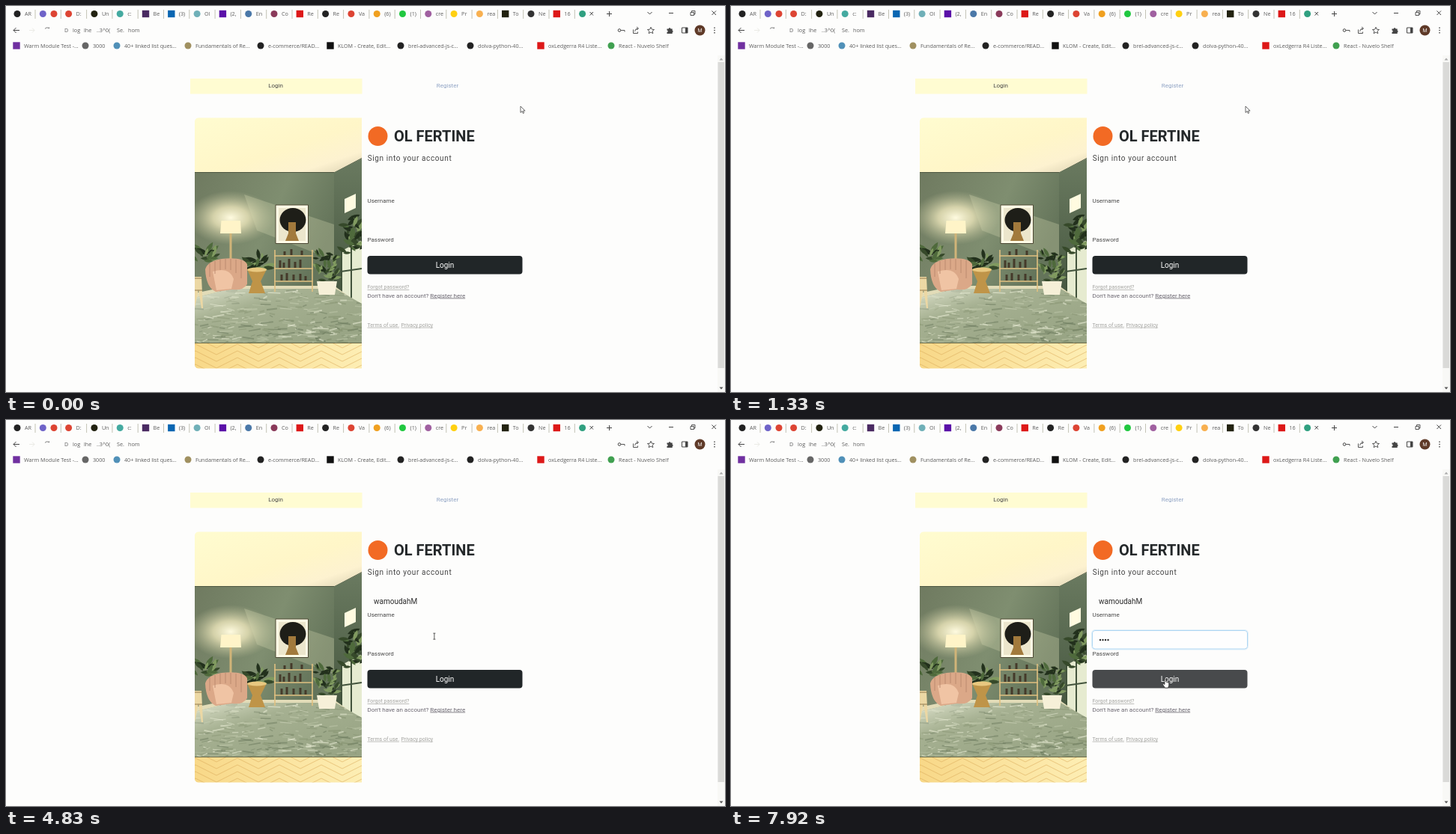
Animation of 960 by 516 pixels, one loop 8 s. Source, as an HTML page:

```html
<!DOCTYPE html>
<html lang="en">
<head>
<meta charset="utf-8">
<title>Sign in</title>
<style>
  html, body { margin: 0; width: 100%; height: 100%; overflow: hidden; background: #fdfdfc; }
  svg { display: block; width: 100vw; height: 100vh; }
  text { font-family: Roboto, sans-serif; white-space: pre; }
  .ui text { font-family: "Open Sans", "Noto Sans", sans-serif; font-size: 7.2px; fill: #5c5c5c; }
  .line { fill: none; stroke: #444; }
  .s7 { font-size: 7px; fill: #a4a4a0; }
  .s8 { font-size: 8px; fill: #484848; }
  .s10 { font-size: 10px; fill: #2c2c2c; }
  .link { text-decoration: underline; }
</style>
</head>
<body>
<svg viewBox="0 0 960 516">
  <defs>
    <linearGradient id="ceiling" x2="1" y2="1">
      <stop stop-color="#fffcd0"/><stop offset=".55" stop-color="#fff6c8"/><stop offset=".8" stop-color="#fdf2d0"/><stop offset="1" stop-color="#d9cfb0"/>
    </linearGradient>
    <linearGradient id="wall" x2="1" y2=".4">
      <stop stop-color="#6f7a60"/><stop offset=".6" stop-color="#7f8e70"/><stop offset="1" stop-color="#64745a"/>
    </linearGradient>
    <linearGradient id="side" x2="0" y2="1">
      <stop stop-color="#6a7a60"/><stop offset="1" stop-color="#42533c"/>
    </linearGradient>
    <radialGradient id="glow">
      <stop stop-color="#fffbe0"/><stop offset=".4" stop-color="#f4ecc0" stop-opacity=".75"/><stop offset="1" stop-color="#c8c8a0" stop-opacity="0"/>
    </radialGradient>
    <linearGradient id="shine" x2=".9" y2="1">
      <stop stop-color="#fffff0" stop-opacity=".75"/><stop offset=".35" stop-color="#e8ecd0" stop-opacity=".25"/><stop offset="1" stop-color="#c8d0b0" stop-opacity=".15"/>
    </linearGradient>
    <linearGradient id="floor" x2="1"><stop stop-color="#f8d888"/><stop offset="1" stop-color="#fdeeb4"/></linearGradient>
    <clipPath id="frame"><path d="M475 149.500V484.500H257a5 5 0 0 1-5-5V154.500a5 5 0 0 1 5-5z"/></clipPath>
    <clipPath id="floorArea"><path d="M252 451h223v34H252z"/></clipPath>
    <clipPath id="rugArea"><path d="M252 390L300 378H440L475 398V450H252z"/></clipPath>
  </defs>
  <rect width="960" height="516" fill="#fdfdfc"/>

  <g class="ui" id="chrome">
    <g class="line">
      <path d="M779.500 8l4.500 4.500m0-4.500l-4.500 4.500M802 10.500h7M805.500 7v7M856.500 8l3 3 3-3M885 9.500h6M942.500 6.500l5.500 5.500m0-5.500l-5.500 5.500"/>
      <path d="M914 8.500h4.500v4H914zM915.500 8V6.500h4.500V11h-1.500" stroke-width=".9"/>
      <path d="M18 32.500h-8m3.500-3.500l-3.500 3.500 3.500 3.500"/>
      <path d="M31 32.500h7m-3-3l3 3-3 3" stroke="#ebebe6"/>
      <path d="M52 30.500a3.600 3.600 0 0 1 5.500-.5v-1.500" stroke="#777"/>
      <path d="M821 32.500h5v2M837.500 31.500v5h6v-2M839.500 34q.5-4 4.500-4m-2-2l2.500 2-2.500 2" stroke-width=".9"/>
      <circle cx="819" cy="32.500" r="1.800"/>
      <path d="M861 28.300l1.300 2.900 3.200.3-2.400 2.100.7 3.100-2.800-1.600-2.800 1.600.7-3.100-2.400-2.100 3.200-.3z" stroke-width=".9"/>
      <path d="M902.500 29h7.500v7h-7.500z"/>
    </g>
    <path d="M882.500 30.500h2.300a1.300 1.300 0 0 1 2.600 0h2.300v2.200a1.300 1.300 0 0 1 0 2.500V37h-7.200v-2a1.200 1.200 0 0 0 0-2.400zM907 29h3v7h-3z" fill="#444"/>
    <path d="M946 28.500v1.500m0 1.700v1.500m0 1.700v1.500" stroke="#444" stroke-width="1.400"/>
    <circle cx="926.500" cy="32.500" r="7" fill="#5f3a28"/>
    <text x="926.500" y="35.300" text-anchor="middle" style="fill:#fff">M</text>
  </g>

  <path d="M950 66h10v450h-10z" fill="#f8f8f6"/>
  <path d="M950.500 75h8.500v409h-8.500z" fill="#dadad8"/>
  <path d="M952.500 72.500l2.500-3 2.500 3z" fill="#aaa"/>
  <path d="M952.500 509.500l2.500 3 2.500-3z" fill="#555"/>

  <path d="M246 97h229.500v20.500H246z" fill="#fffcd2"/>
  <text class="s8" x="360" y="109" text-anchor="middle">Login</text>
  <text class="s8" x="589.500" y="109" text-anchor="middle" style="fill:#8fa3c4">Register</text>

  <g clip-path="url(#frame)">
    <path d="M252 149h223v75H252z" fill="url(#ceiling)"/>
    <path d="M252 222.500h187V392H252z" fill="url(#wall)"/>
    <path d="M252 222.500h187l36-19" fill="none" stroke="#4c5640"/>
    <path d="M438 222.500L475 204V410l-37-30z" fill="url(#side)"/>
    <ellipse cx="300" cy="283" rx="58" ry="36" fill="url(#glow)"/>
    <path d="M318 252L438 292V340L335 300z" fill="#d4d8b0" opacity=".3"/>
    <path d="M452 258l15-7v19l-15 7z" fill="#fffbe0"/>
    <path d="M447 328l28-15v92l-28-22z" fill="#e6ebd0"/>
    <path d="M448 328v56M461 320v74M447 355l28-4" stroke="#42533c" stroke-width="2"/>
    <path d="M252 384L300 374H438L475 400V484H252z" fill="#e2dcb8"/>
    <path d="M252 450h223v35H252z" fill="url(#floor)"/>
    <path id="planks" clip-path="url(#floorArea)" fill="none" stroke="#d8aa58" stroke-width=".8" opacity=".7"/>
    <g clip-path="url(#rugArea)">
      <path d="M252 376h223v75H252z" fill="#8f9c7c"/>
      <g id="rug"></g>
      <path d="M252 376h223v75H252z" fill="url(#shine)"/>
    </g>
    <path d="M252 450.500h223" stroke="#6a6a48"/>
    <path d="M287.500 287h25.500l1 17h-28z" fill="#fff4c8"/>
    <path d="M300 304v34" stroke="#d0b478" stroke-width="3"/>
    <path d="M360 266h43.500v51.500H360z" fill="#fffbe6" stroke="#4c4834"/>
    <path d="M364 270h36v44h-36z" fill="#ece6cc"/>
    <ellipse cx="383" cy="286" rx="17.500" ry="16" fill="#1e1e18"/>
    <path d="M377 289h10v15l4 10h-18l4-10z" fill="#a27a3c"/>
    <g id="greens"></g>
    <path d="M266 352q3-11 22-14 28-3 34 7v27q-6 9-20 7l-22 3q-13-6-14-30z" fill="#dba888"/>
    <path d="M276 355q22-7 28 10l-3 13-20 2z" fill="#f0c4a4"/>
    <path d="M272 344v18m7-21v17m7-19v14m7-15v14m7-14v15m7-14v18m7-17v24" stroke="#b5846a" stroke-width=".8"/>
    <path d="M322 352h26l-8 16 6 16h-22l5-16z" fill="#bf9448"/>
    <ellipse cx="335" cy="352.500" rx="13" ry="3" fill="#e8c880"/>
    <path d="M359 326v56m50-56v56M358 334h52M358 351h52M358 368h52" fill="none" stroke="#e0c080" stroke-width="1.600"/>
    <path d="M366 350v-10m5 10v-7m7 7v-12m8 12v-8m7 8v-11m-25 28v-8m7 8v-10m9 10v-8m9 8v-9m7 9v-6M372 333v-5m9 5v-8m14 8v-6" stroke="#453a2a" stroke-width="3"/>
    <path d="M415 368h27l-3 18h-21z" fill="#f6f0d8"/>
    <path d="M252 362h9l2 42h-2l-4-25-5 25z" fill="#ecd8a4"/>
    <path d="M252 364h10M252 380h10" stroke="#937a4c"/>
  </g>

  <circle cx="496.500" cy="174" r="13" fill="#f26a24"/>
  <text x="518" y="180.500" font-size="20" font-weight="700" fill="#24282a">OL FERTINE</text>
  <text class="s10" x="482.700" y="207" letter-spacing=".62" style="fill:#444">Sign into your account</text>
  <text class="s8" x="482.500" y="262.500">Username</text>
  <text class="s8" x="482.500" y="314.500">Password</text>
  <g id="rings" fill="#fefefe" stroke="#aed6f2">
    <g opacity="0"><rect x="481.500" y="228" width="209" height="26.500" rx="4.500" stroke="#e0f0fa"/><rect x="482.500" y="229" width="207" height="24.500" rx="3.500"/></g>
    <g opacity="0"><rect x="481.500" y="280.500" width="209" height="26.500" rx="4.500" stroke="#e0f0fa"/><rect x="482.500" y="281.500" width="207" height="24.500" rx="3.500"/></g>
  </g>
  <text class="s10" id="user" x="491" y="245.500"></text>
  <g id="dots" fill="#2c2c2c"></g>
  <path id="caret" d="M0 0v11" stroke="#444" stroke-width=".8"/>
  <rect id="button" x="482.500" y="334" width="207" height="24.500" rx="4"/>
  <text class="s10" x="586" y="350.300" text-anchor="middle" style="fill:#fff">Login</text>
  <text class="s7 link" x="482.500" y="378.300">Forgot password?</text>
  <text class="s8" x="482.500" y="389.500" style="fill:#6a6670">Don't have an account? <tspan class="link">Register here</tspan></text>
  <text class="s7 link" x="482.500" y="428.700">Terms of use.</text>
  <text class="s7 link" x="527.500" y="428.700">Privacy policy</text>

  <g id="pointer" stroke-linejoin="round">
    <path d="M0 0v8.500l2-1.900 1.400 3 1.300-.6-1.300-2.900h2.700z" fill="#fefefe" stroke="#444" stroke-width=".8"/>
    <path d="M-1.500-4h3M0-4v8M-1.500 4h3" stroke="#444" fill="none" stroke-width=".9"/>
    <path d="M-1-4.500q1-1 1.700 0V-1l4 1v4L3.500 7h-4L-3.500 2.500l.8-1L-1 2.500z" fill="#fefefe" stroke="#2c2c2c" stroke-width=".7"/>
  </g>
</svg>
<script>
const $ = id => document.getElementById(id);
const add = (id, markup) => $(id).insertAdjacentHTML("beforeend", markup);

// Browser bars: plain marks, drawn as a circle, or as a square when marked "s"
const icon = (x, y, [color, shape]) => shape === "s"
  ? `<rect x="${x - 4.7}" y="${y - 4.7}" width="9.4" height="9.4" fill="${color}"/>`
  : `<circle cx="${x}" cy="${y}" r="4.5" fill="${color}"/>`;
const label = (x, y, s) => `<text x="${x}" y="${y}">${s}</text>`;

const tabs = `AR #222|  #6f63c8|D: #dd4433|Un #222210|c: #44aaa0|Be #4a2a62 s|(3) #0a66b2 s|Ol #70b0b8|(2, #5a10a8 s|En #4a78a8|Co #8a3a5a|Re #dd1818 s|Re #222|Va #dd4433|(6) #f0a020|(1) #20c840|cre #a060a0|Pr #ffd010|rea #f8b050|To #222210 s|Ne #333|16 #dd1818 s| #30a080`;
tabs.split("|").forEach((tab, i) => {
  const [, text, color, shape] = tab.match(/^(.*?) *(#\w+) ?(s?)$/), x = 15 + 34.3 * i;
  add("chrome", icon(x, 10.5, [color, shape]) + label(x + 10, 13, text) +
    (i < 22 ? `<path d="M${x + 24} 5v12" stroke="#b4b4a4" stroke-width=".8"/>` : ""));
});
add("chrome", icon(64, 10.5, ["#dd4433"]));

[
  [14, "Warm Module Test -...", "#7030a0", "s"], [106, "3000", "#666"],
  [148, "40+ linked list ques...", "#5090b8"], [243, "Fundamentals of Re...", "#a09060"],
  [340, "e-commerce/READ...", "#222"], [433, "KLOM - Create, Edit...", "#111", "s"],
  [527, "brel-advanced-js-c...", "#222"], [620, "dolva-python-40...", "#222"],
  [714, "oxLedgerra R4 Liste...", "#dd1818", "s"], [808, "React - Nuvelo Shelf", "#40a050"]
].forEach(([x, text, ...mark]) => add("chrome", icon(x, 53, mark) + label(x + 10, 55.5, text)));

[[78, "D"], [89, "log"], [104, "lhe"], [121, "..3^0("], [148, "Se."], [163, "hom"]]
  .forEach(([x, s]) => add("chrome", label(x, 35, s)));

// Room details
let seed = 7;
const rnd = (a = 0, b = 1) => {
  seed = seed * 16807 % 2147483647;
  return a + (b - a) * seed / 2147483647;
};
const pick = list => list[Math.floor(rnd(0, list.length))];
const leaf = (x, y, angle, len, color) =>
  `<path transform="translate(${x} ${y}) rotate(${angle})" d="M0 0Q${len / 2} ${-len / 3} ${len} 0Q${len / 2} ${len / 3} 0 0" fill="${color}"/>`;

function plant(x, y, spreadX, spreadY, count, len) {
  let out = "";
  for (let i = 0; i < count; i++) {
    out += leaf(x + rnd(-spreadX, spreadX), y + rnd(-spreadY, spreadY), rnd(-190, 10), len * rnd(.6, 1.2),
      pick(["#22301c", "#36492a", "#4f6a3c", "#809a60"]));
  }
  return out;
}
add("greens", plant(270, 334, 14, 9, 16, 16) + plant(336, 344, 8, 6, 18, 16) +
  plant(428, 350, 11, 17, 42, 13) + plant(465, 308, 10, 22, 38, 16));

for (let i = 0; i < 300; i++) {
  const y = 378 + 73 * rnd() ** .8, x = rnd(246, 475), w = rnd(4, 18);
  add("rug", `<path d="M${x} ${y}l${w} ${rnd(-3, 3)}" stroke="${pick(["#56664a", "#72805e", "#b4bea0", "#e6ead4"])}" stroke-width="${rnd(.7, 2.2)}" opacity=".6"/>`);
}
let planks = "";
for (let x = 225; x < 490; x += 56)
  for (let k = -3; k < 5; k++) planks += `M${x} ${466 + k * 9}l28-14 28 14`;
$("planks").setAttribute("d", planks);

// Interaction
const LOOP = 8000, STEP = 1000 / 12;
const USER = "wamoudahM", USER_START = 3600, USER_KEY = 90;
const SECRET_KEYS = [6420, 6750, 7060, 7320];
const PATH = [[0, 687, 134], [2100, 687, 134], [2900, 601, 256], [4480, 601, 256],
  [4820, 572, 289], [5000, 566, 296], [7420, 566, 296], [7800, 580, 351], [LOOP, 580, 351]];
const FOCUS = [[2950, 4650], [5000, LOOP]];

const clamp = v => Math.max(0, Math.min(1, v));
const ease = v => v * v * (3 - 2 * v);
const fade = (t, start) => clamp((t - start) / 150);

function pointerAt(t) {
  const i = PATH.findIndex(p => p[0] > t);
  const [t0, x0, y0] = PATH[i - 1], [t1, x1, y1] = PATH[i];
  const k = ease((t - t0) / (t1 - t0));
  return [x0 + (x1 - x0) * k, y0 + (y1 - y0) * k];
}

const rings = [...$("rings").children], shapes = [...$("pointer").children];
SECRET_KEYS.forEach((_, i) => add("dots", `<circle cx="${493 + 3.5 * i}" cy="294" r="1.2"/>`));

function draw(t) {
  const [x, y] = pointerAt(t);
  const kind = y > 334 ? 2 : y > 222 ? 1 : 0;
  $("pointer").setAttribute("transform", `translate(${x} ${y})`);
  shapes.forEach((s, i) => s.style.display = i === kind ? "" : "none");

  const typed = Math.max(0, Math.min(USER.length, Math.floor((t - USER_START) / USER_KEY) + 1));
  $("user").textContent = USER.slice(0, typed);
  const hidden = SECRET_KEYS.filter(k => k <= t).length;
  [...$("dots").children].forEach((d, i) => d.style.display = i < hidden ? "" : "none");

  rings.forEach((ring, i) => ring.setAttribute("opacity", fade(t, FOCUS[i][0]) - fade(t, FOCUS[i][1])));
  const field = FOCUS.findIndex(([a, b]) => t >= a && t < b);
  const userKeys = typed ? [USER_START + (typed - 1) * USER_KEY] : [];
  const last = field < 0 ? 0 : Math.max(FOCUS[field][0], ...(field ? SECRET_KEYS.slice(0, hidden) : userKeys));
  const on = field >= 0 && (t - last) % 1000 < 500;
  const caretX = field ? 491.5 + 3.5 * hidden : 491.5 + (typed ? $("user").getComputedTextLength() : 0);
  $("caret").style.display = on ? "" : "none";
  $("caret").setAttribute("transform", `translate(${caretX} ${field ? 288.5 : 236.5})`);

  const h = fade(t, 7690);
  const mix = (a, b) => Math.round(a + (b - a) * h);
  $("button").setAttribute("fill", `rgb(${mix(33, 72)},${mix(38, 74)},${mix(40, 76)})`);
}

function tick() {
  const t = performance.now() % LOOP;
  draw(Math.min(LOOP - 1, Math.floor((t + 4) / STEP) * STEP));
  requestAnimationFrame(tick);
}
tick();
</script>
</body>
</html>
```
